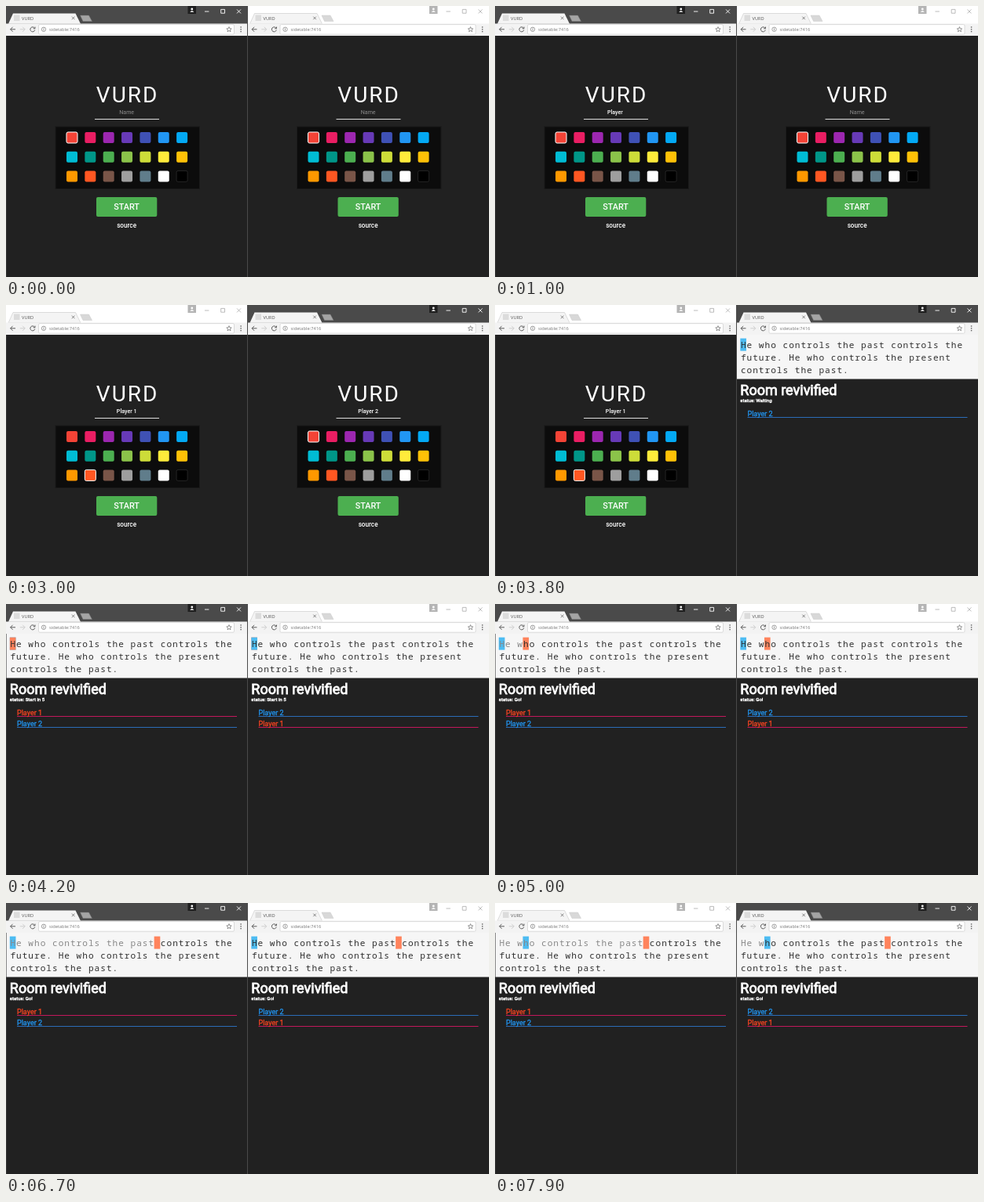
An HTML page for the animation above (8000 ms loop, 615 by 346 pixels).

```html
<!DOCTYPE html>
<html lang="en">
<head>
<meta charset="utf-8">
<title>Typing race</title>
<style>
html, body { margin: 0; width: 100%; height: 100%; overflow: hidden; background: #212121; }
svg { display: block; width: 615px; height: 346px; }
text { font-family: Roboto, sans-serif; white-space: pre; }
.ui { font-family: "Open Sans", "Noto Sans", sans-serif; font-size: 5.7px; }
.mono { font-family: "Noto Sans Mono", "DejaVu Sans Mono", monospace; font-size: 11.1px; letter-spacing: 1px; }
.mid { text-anchor: middle; }
</style>
</head>
<body>
<svg id="stage" viewBox="0 0 615 346"></svg>
<script>
const stage = document.getElementById('stage');
const TITLE = 'VURD', ADDRESS = 'sidetable:7416';
const SWATCHES = ('f44336 e91e63 9c27b0 673ab7 3f51b5 2196f3 03a9f4 00bcd4 009688 4caf50 8bc34a ' +
  'cddc39 ffeb3b ffc107 ff9800 ff5722 795548 9e9e9e 607d8b ffffff 000000').split(' ');
const LINES = ['He who controls the past controls the', 'future. He who controls the present', 'controls the past.'];
const PITCH = 7.66;
const PLAYERS = [
  { name: 'Player 1', ink: '#fa4420', mark: '#ff835c', bar: '#c2185b' },
  { name: 'Player 2', ink: '#2196f3', mark: '#4dbcf2', bar: '#2b6cb8' }
];

const clamp = (v, lo, hi) => Math.max(lo, Math.min(hi, v));
const rect = (x, y, w, h, fill, more = '') =>
  `<rect x="${x}" y="${y}" width="${w}" height="${h}" fill="${fill}" ${more}/>`;
const path = (d, stroke, width = 1, fill = 'none') =>
  `<path d="${d}" stroke="${stroke}" stroke-width="${width}" fill="${fill}"/>`;
const text = (x, y, str, fill, more = '') => `<text x="${x}" y="${y}" fill="${fill}" ${more}>${str}</text>`;
// regular weight thickened by an outline
const thick = (x, y, str, fill, size, stroke) =>
  text(x, y, str, fill, `font-size="${size}" stroke="${fill}" stroke-width="${stroke}"`);

function chrome(active) {
  const button = active ? '#fff' : '#b4b4b4';
  return rect(0, 0, 307.5, 23, active ? '#4a4a4a' : '#fff') +
    path('M3 22.8L9 9.5H88.5L95 22.8Z', active ? 'none' : '#c8c8c8', .6, '#f4f4f4') +
    path('M94.5 12H105.5L109.5 19.5H98Z', active ? '#777' : '#c8c8c8', .5, active ? '#a4a4a4' : '#d8d8d8') +
    rect(10, 11.5, 7.5, 7.5, '#dcdcdc') +
    text(20, 17.6, TITLE, '#555', 'class="ui"') +
    path('M83.8 13.6l3.6 3.6m0-3.6l-3.6 3.6', '#666', .8) +
    rect(231.5, 0, 10.5, 10, active ? '#1f1f1f' : '#b4b4b4') +
    `<circle cx="236.8" cy="3.9" r="1.4" fill="#fff"/>` +
    path('M234.2 7.8q2.6-3.4 5.2 0z', 'none', 0, '#fff') +
    path('M253 7h5.4M273.7 4.4h4.8v4.8h-4.8zM294 4.4l5 5m0-5l-5 5', button, .9) +
    rect(0, 22.5, 307.5, 15.5, '#f3f3f3') +
    path('M12 29.8H5.6m3-3l-3 3l3 3', '#5c5c5c', 1) +
    path('M17.8 29.8h6.4m-3-3l3 3l-3 3', '#cfcfcf', 1) +
    path('M36.4 28.2a3 3 0 1 0 .4 2.4M37 26.6v2.2h-2.3', '#5c5c5c', 1) +
    rect(41.5, 23.6, 249, 12.6, '#fff', 'rx="1.5" stroke="#cdcdcd" stroke-width=".7"') +
    `<circle cx="48" cy="29.8" r="2.7" fill="none" stroke="#777" stroke-width=".7"/>` +
    path('M48 29.3v2M48 28v.7', '#777', .8) +
    text(55, 32, ADDRESS, '#777', 'class="ui"') +
    path('M284 26.6l.9 2.2 2.3.2-1.8 1.5.6 2.3-2-1.3-2 1.3.6-2.3-1.8-1.5 2.3-.2z', '#666', .7) +
    [27, 29.8, 32.6].map(y => rect(298.4, y - .7, 1.4, 1.4, '#5c5c5c')).join('');
}

function lobby(name, picked) {
  const swatches = SWATCHES.map((c, i) => {
    const x = 84 + i % 7 * 23.35, y = 168 + Math.floor(i / 7) * 24.7;
    const edge = i === picked ? 'stroke="#fff"' : i === 20 ? 'stroke="#333" stroke-width=".7"' : '';
    return rect(x - 7, y - 7, 14, 14, '#' + c, 'rx="2" ' + edge);
  }).join('');
  return text(114.8, 123, TITLE, '#fff', 'font-size="28" letter-spacing="2"') +
    text(153.7, 138, name || 'Name', name ? '#fff' : '#8c8c8c',
      `class="mid" font-size="7.1" font-weight="${name ? 500 : 400}"`) +
    rect(113, 144, 82, 1, '#ddd') +
    rect(63, 154, 183.5, 79.5, '#0c0c0c', 'stroke="#1a1a1a"') + swatches +
    rect(115, 244, 77.3, 25, '#4caf50', 'rx="2"') +
    text(153.6, 260.3, 'START', '#fff', 'class="mid" font-size="10.8" font-weight="500"') +
    text(153.6, 283, 'source', '#fff', 'class="mid" font-size="8.2" font-weight="500"');
}

function race(self, places, status, joined) {
  const order = [self, 1 - self].slice(0, joined);
  const marks = order.slice().reverse()
    .map(p => rect(4.8 + places[p] * PITCH, 42.6, PITCH, 16, PLAYERS[p].mark)).join('');
  const typed = places[self];
  const words = LINES.map((line, i) => {
    const done = i ? 0 : typed;
    return text(5.4, 55 + i * 16,
      `<tspan fill="#888">${line.slice(0, done)}</tspan>${line.slice(done)}`, '#303030', 'class="mono"');
  }).join('');
  const list = order.map((p, i) =>
    rect(14, 143 + i * 14, 280, 1, PLAYERS[p].bar) +
    thick(14, 142 + i * 14, PLAYERS[p].name, PLAYERS[p].ink, 9, .3)).join('');
  return rect(0, 38, 307.5, 56.5, '#f6f6f6') + marks + words +
    thick(4.8, 115.2, 'Room revivified', '#fff', 18, .85) +
    thick(4.8, 124.4, 'status: ' + status, '#fff', 6.1, .4) + list;
}

function draw(t) {
  const tick = start => Math.floor((t - start) / 100);
  const leftActive = t < 2000 || t >= 4200 && t < 7400;
  const first = t < 5800
    ? Math.round(clamp(tick(4700), 0, 11) * 15 / 11)
    : 15 + clamp(tick(5800), 0, 9);
  const places = [first, clamp(tick(7500), 0, 4)];
  const count = 5 - tick(4200);
  const status = t < 4200 ? 'Waiting' : count > 0 ? 'Start in ' + count : 'Go!';
  const typedName = (p, start) => PLAYERS[p].name.slice(0, clamp(tick(start), 0, 8));

  const left = t < 4200
    ? lobby(typedName(0, 300), t < 1600 ? 0 : 15)
    : race(0, places, status, 2);
  const right = t < 3800
    ? lobby(typedName(1, 2100), t < 3600 ? 0 : 6)
    : race(1, places, status, t < 4200 ? 1 : 2);

  stage.innerHTML = rect(0, 0, 615, 346, '#212121') +
    `<g>${chrome(leftActive)}${left}</g>` +
    `<g transform="translate(307.5)">${chrome(!leftActive)}${right}</g>` +
    rect(307, 0, 1, 346, '#4a4a4a') + rect(0, 38, .6, 308, '#444');
}

let shown = -1;
function frame() {
  const step = Math.floor(performance.now() % 8000 / 100);
  if (step !== shown) draw((shown = step) * 100);
  requestAnimationFrame(frame);
}
frame();
</script>
</body>
</html>
```
